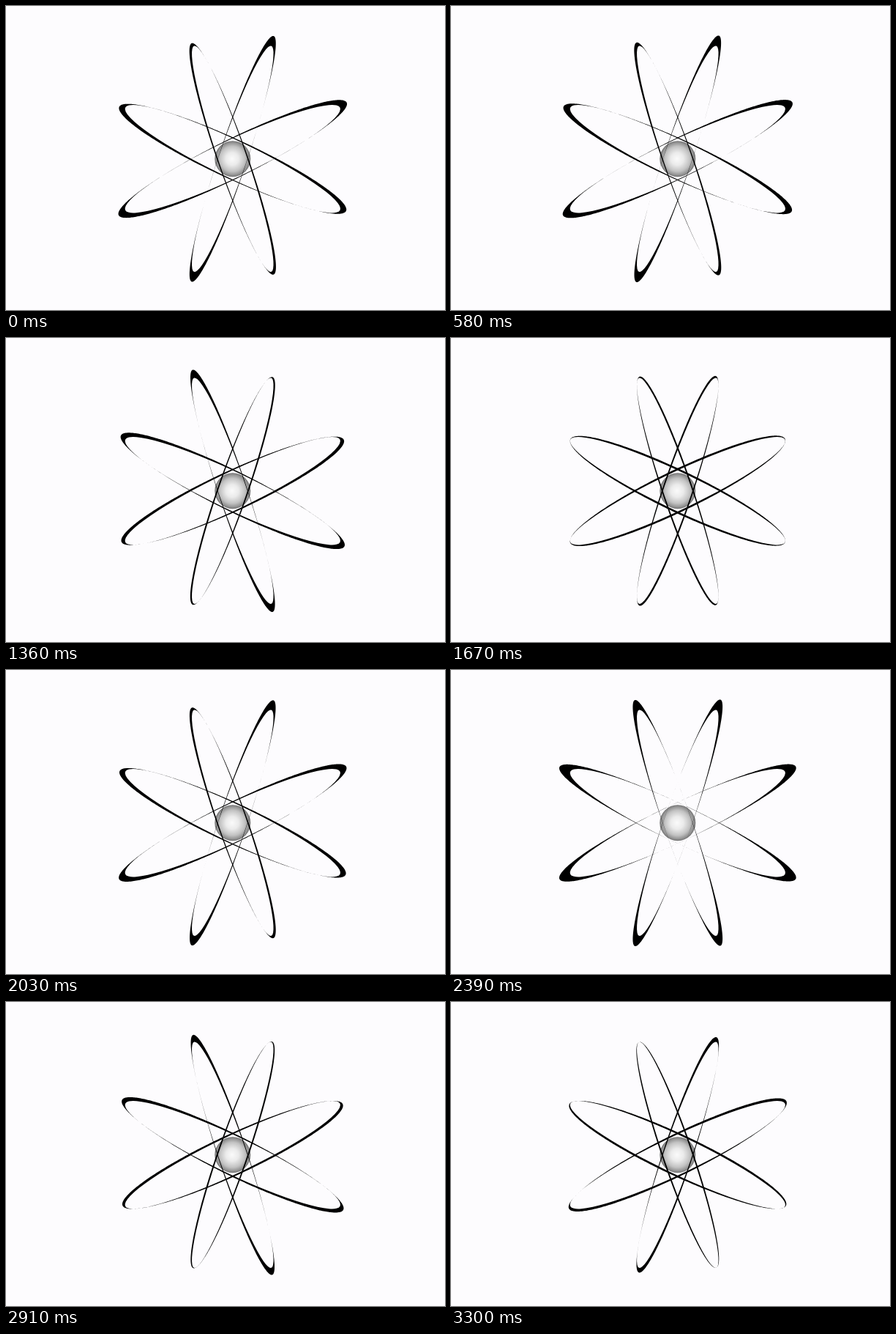
Recreate the animation shown at these times as an HTML page with a canvas. Size 600 by 415 pixels, loop 3330 ms.

```html
<!DOCTYPE html>
<html lang="en">
<head>
<meta charset="utf-8">
<title>Atom</title>
<style>
html, body { margin: 0; height: 100%; overflow: hidden; background: #fdfcfe; }
canvas { display: block; }
</style>
</head>
<body>
<canvas id="stage" width="600" height="415"></canvas>
<script>
const ctx = document.getElementById('stage').getContext('2d');
const LOOP = 3330, HOLD = 550;   // ms
const SPEED = 0.12;              // degrees per ms
const START = -42.5;             // degrees
const SWELL = 0.1;               // widest part of a band, as a share of its radius
const CX = 309.8, CY = 208.7, CORE = 24.5;
const rad = deg => deg * Math.PI / 180;

// a, b: radii; tilt: angle on the stage; lag: shift of the wide part
const orbits = [
  { a: 162.6, b: 25.5, tilt: 25.5, lag: -6 },
  { a: 162.6, b: 25.5, tilt: -25.5, lag: 6 },
  { a: 162.9, b: 19.1, tilt: 71.1, lag: -18 },
  { a: 162.9, b: 19.1, tilt: -71.1, lag: 18 }
];

const shade = ctx.createRadialGradient(-1, 0, 0, 0, 0, CORE);
[[0, '#fafafa'], [0.35, '#ebebeb'], [0.7, '#c2c2c2'], [0.92, '#8e8e8e'], [1, '#6e6e6e']]
  .forEach(([at, color]) => shade.addColorStop(at, color));

function drawCore() {
  ctx.fillStyle = shade;
  ctx.beginPath();
  ctx.arc(0, 0, CORE, 0, 2 * Math.PI);
  ctx.fill();
}

// A band between a fixed ellipse and one that bulges at two opposite points
function drawOrbit({ a, b, tilt, lag }, turn) {
  ctx.save();
  ctx.rotate(rad(tilt));
  ctx.beginPath();
  for (let deg = 0; deg < 360; deg++) {
    const r = 1 + SWELL * Math.cos(rad(deg - turn - lag)) ** 2;
    ctx.lineTo(a * r * Math.cos(rad(deg)), b * r * Math.sin(rad(deg)));
  }
  ctx.closePath();
  ctx.moveTo(a, 0);
  ctx.ellipse(0, 0, a, b, 0, 0, 2 * Math.PI);
  ctx.fillStyle = '#000';
  ctx.fill('evenodd');
  ctx.restore();
}

function draw(now) {
  const t = now % LOOP;
  const turn = START + SPEED * Math.max(0, t - HOLD);
  ctx.setTransform(1, 0, 0, 1, 0, 0);
  ctx.fillStyle = '#fdfcfe';
  ctx.fillRect(0, 0, 600, 415);
  ctx.translate(CX, CY);
  drawCore();
  orbits.forEach(orbit => drawOrbit(orbit, turn));
}

let begin;
function tick(now) {
  begin ??= now;
  draw(now - begin);
  requestAnimationFrame(tick);
}
draw(0);
requestAnimationFrame(tick);
</script>
</body>
</html>
```
